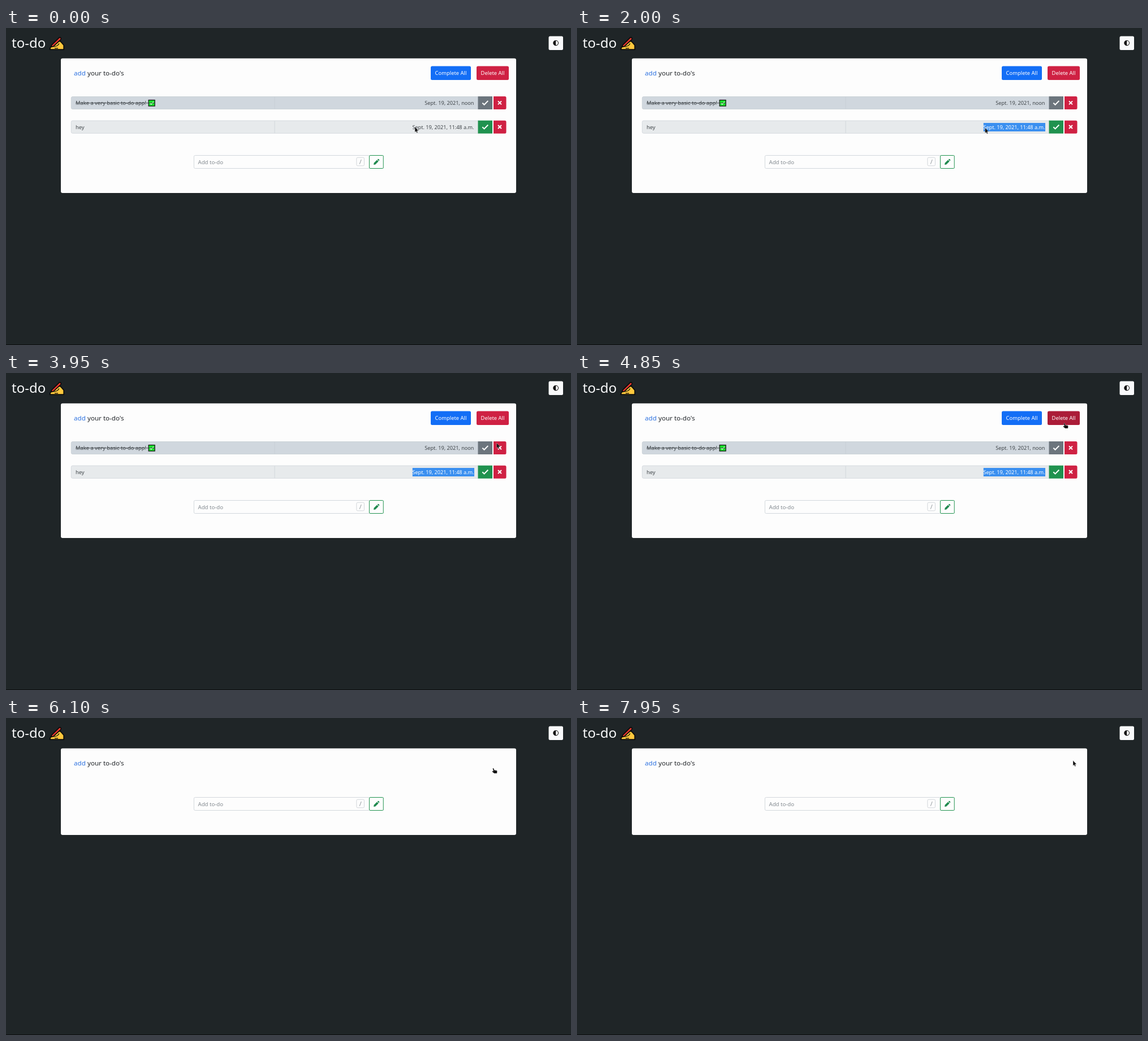
An HTML page for the animation above (8 s loop, 999 by 561 pixels).

```html
<!DOCTYPE html>
<html lang="en">
<head>
<meta charset="utf-8">
<title>to-do</title>
<style>
  html, body { margin: 0; width: 100%; height: 100%; overflow: hidden; background: #1f2527; }
  svg { display: block; width: 999px; height: 561px; font-family: "Noto Sans", "Open Sans", sans-serif; }
  .name { font-size: 9.35px; fill: #3f4549; }
  .date { font-size: 9.15px; fill: #3f4549; text-anchor: end; }
  .label { font-size: 9.4px; fill: #fff; text-anchor: middle; }
  .head { font-size: 11.6px; font-weight: 500; }
  .red { fill: #cf2143; }
  .red.hover { fill: #ab1c38; }
  .green { fill: #20924f; }
  .green.hover { fill: #1a7b43; }
  .blue { fill: #136ef6; }
  .blue.hover { fill: #0f5cd0; }
  .icon { fill: none; stroke: #fff; stroke-width: 2; }
</style>
</head>
<body>
<svg viewBox="0 0 999 561">
  <defs>
    <path id="tick" class="icon" d="M-5 .2 L-1.7 3.4 L5 -3.5"/>
    <path id="cross" class="icon" d="M-3 -3 L3 3 M3 -3 L-3 3"/>
    <clipPath id="picked"><rect id="pickedBox" y="168" height="15"/></clipPath>
  </defs>

  <rect width="999" height="561" fill="#1f2527"/>
  <rect y="560" width="999" height="1" fill="#0b0d0e"/>

  <text x="10" y="34.5" font-size="24" font-weight="500" fill="#f8f9fa">to-do</text>

  <!-- writing hand -->
  <g stroke="#0a0a0a" stroke-width="1.7" stroke-linejoin="round">
    <path fill="#ffc83d" d="M77.5 38.2 L78.5 34.5 L84 29 L91 24.5 Q95 22 97.5 25 L102.2 30.5 V38.2 Z"/>
    <path fill="#e8382f" d="M79.3 33.6 L81.2 29.6 L93.7 17.3 Q95.6 16 97 17.7 Q98 19.3 96.7 20.6 L83.7 32.7 Z"/>
    <path fill="none" stroke-width="1.2" d="M84.5 33.2 L91 31.2 L94 27.5 M86 35.8 H92"/>
  </g>

  <rect x="959.5" y="14.5" width="25.5" height="24.5" rx="2.5" fill="#f8f9fa"/>
  <circle cx="972.2" cy="26.6" r="4.3" fill="#fff" stroke="#111" stroke-width="1.1"/>
  <path d="M972.2 22 A4.6 4.6 0 0 0 972.2 31.2 Z" fill="#111"/>

  <rect id="card" x="97" y="53.7" width="805" rx="3" fill="#fdfdfd"/>
  <text class="head" x="120" y="84" fill="#2d72e0">add</text>
  <text class="head" x="144" y="84" fill="#212529">your to-do's</text>

  <g id="list">
    <rect id="completeAll" class="blue" x="751" y="67.5" width="71" height="24.5" rx="2.5"/>
    <text class="label" x="786.5" y="82.8">Complete All</text>
    <rect id="deleteAll" class="red" x="832" y="67.5" width="57" height="24.5" rx="2.5"/>
    <text class="label" x="860.5" y="82.8">Delete All</text>

    <rect x="115.3" y="121.5" width="722" height="22" rx="2.5" fill="#d0d7de" stroke="#c6cdd4" stroke-width=".8"/>
    <path d="M475 122 V143" stroke="#c6cdd4" stroke-width=".8"/>
    <text class="name" x="123" y="136">Make a very basic to-do app!</text>
    <rect x="252.1" y="127.5" width="11" height="10.6" fill="#19e32a" stroke="#111" stroke-width="1.2"/>
    <path d="M254.5 132.8 L256.7 135.1 L260.9 130.3" fill="none" stroke="#e8ffe8" stroke-width="1.1"/>
    <path d="M123 132.8 H264" stroke="#3f4549" stroke-width=".9"/>
    <text class="date" x="827.5" y="136">Sept. 19, 2021, noon</text>
    <rect x="834.5" y="121" width="25.5" height="23" fill="#6c757d"/>
    <use href="#tick" x="847.3" y="132.4"/>
    <path class="red" d="M862 121 H882 a2.5 2.5 0 0 1 2.5 2.5 V141.5 a2.5 2.5 0 0 1 -2.5 2.5 H862 Z"/>
    <use href="#cross" x="873" y="132.4"/>

    <rect x="115.3" y="164" width="722" height="22.3" rx="2.5" fill="#e7eaec" stroke="#ced4da" stroke-width=".8"/>
    <path d="M475 164.5 V186" stroke="#ced4da" stroke-width=".8"/>
    <text class="name" x="123" y="178.6">hey</text>
    <text class="date" x="827.5" y="178.6">Sept. 19, 2021, 11:48 a.m.</text>
    <g clip-path="url(#picked)">
      <rect x="718.5" y="168" width="109.5" height="15" fill="#3a8ff0"/>
      <text class="date" x="827.5" y="178.6" style="fill:#fff">Sept. 19, 2021, 11:48 a.m.</text>
    </g>
    <rect id="done" class="green" x="834.5" y="163.7" width="25.5" height="23"/>
    <use href="#tick" x="847.3" y="175"/>
    <path id="remove" class="red" d="M862 163.7 H882 a2.5 2.5 0 0 1 2.5 2.5 V184.2 a2.5 2.5 0 0 1 -2.5 2.5 H862 Z"/>
    <use href="#cross" x="873" y="175"/>
  </g>

  <g id="form">
    <path d="M642 225.5 H334.5 a2.2 2.2 0 0 0 -2.2 2.2 V246.3 a2.2 2.2 0 0 0 2.2 2.2 H642" fill="#fdfdfd" stroke="#ced4da" stroke-width=".9"/>
    <text x="339.5" y="240.6" font-size="9.6" fill="#82898f">Add to-do</text>
    <rect x="619.8" y="229.2" width="13.6" height="14.6" rx="2" fill="none" stroke="#cfd3d7" stroke-width=".9"/>
    <path d="M628.2 232.8 L625.2 240.8" stroke="#888f95" stroke-width=".9"/>
    <rect x="642.4" y="225.5" width="24.8" height="23" rx="1.5" fill="#fdfdfd" stroke="#20924f"/>
    <path fill="#208a4f" d="M650 242 L650.6 238.8 L656 233.4 L658.6 236 L653.2 241.4 Z M656.7 232.7 L657.6 231.9 Q658.3 231.4 659 232.1 L659.9 233 Q660.5 233.7 659.9 234.4 L659.2 235.2 Z"/>
  </g>

  <g id="pointer">
    <path id="arrow" d="M0 0 V9.2 L2 7.4 L3.4 10.4 L4.9 9.7 L3.6 6.8 L6.2 6.5 Z" fill="#111" stroke="#eee" stroke-width=".35"/>
    <path id="hand" d="M-.9 .9 Q0 -.5 1 .9 L2 3.8 L5.6 4.3 Q7 4.6 7 6 L6.6 9.6 H1.6 L-1.9 6.6 Q-2.4 5.3 -1 5.2 L.2 5.6 Z" fill="#111" stroke="#eee" stroke-width=".35"/>
  </g>
</svg>
<script>
const LOOP = 8000, STEP = 50;
const PICK_START = 1350, CLEARED = 6050, LEAVE = 6500;
const TEXT_LEFT = 718.5, TEXT_RIGHT = 828;

// time, x, y of the pointer tip
const path = [
  [0, 723, 175.2], [400, 723, 175.2], [1100, 830.5, 175.5], [1350, 830.5, 175.5],
  [1850, 721.5, 176.8], [2300, 721.5, 176.8], [2900, 876.5, 175.5], [3500, 876.5, 175.5],
  [4300, 861.5, 88.5], [LEAVE, 861.5, 88.5], [7300, 877, 75.3], [LOOP, 877, 75.3]
];

const $ = id => document.getElementById(id);
const buttons = ["completeAll", "deleteAll", "done", "remove"].map($);
const boxes = buttons.map(b => b.getBBox());
const ease = k => k * k * (3 - 2 * k);
const show = (el, on) => el.setAttribute("visibility", on ? "visible" : "hidden");

function pointerAt(t) {
  const i = path.findIndex(p => p[0] > t);
  const [t0, x0, y0] = path[i - 1], [t1, x1, y1] = path[i];
  const k = ease((t - t0) / (t1 - t0));
  return [x0 + (x1 - x0) * k, y0 + (y1 - y0) * k];
}

function draw(t) {
  const [x, y] = pointerAt(t);
  const full = t < CLEARED;
  let overButton = !full && t < LEAVE;

  $("list").style.display = full ? "" : "none";
  $("card").setAttribute("height", full ? 238.3 : 153.2);
  $("form").setAttribute("transform", `translate(0 ${full ? 0 : -85})`);

  buttons.forEach((b, i) => {
    const r = boxes[i];
    const over = full && x > r.x && x < r.x + r.width && y > r.y && y < r.y + r.height;
    b.classList.toggle("hover", over);
    overButton = overButton || over;
  });

  let left = TEXT_RIGHT;
  if (t >= PICK_START) left = t >= 1850 || x < 723 ? TEXT_LEFT : Math.min(x, TEXT_RIGHT);
  $("pickedBox").setAttribute("x", left);
  $("pickedBox").setAttribute("width", TEXT_RIGHT - left);

  $("pointer").setAttribute("transform", `translate(${x} ${y})`);
  show($("hand"), overButton);
  show($("arrow"), !overButton);
}

const start = performance.now();
function tick() {
  const t = (performance.now() - start) % LOOP;
  draw(Math.floor(t / STEP) * STEP);
  requestAnimationFrame(tick);
}
tick();
</script>
</body>
</html>
```
